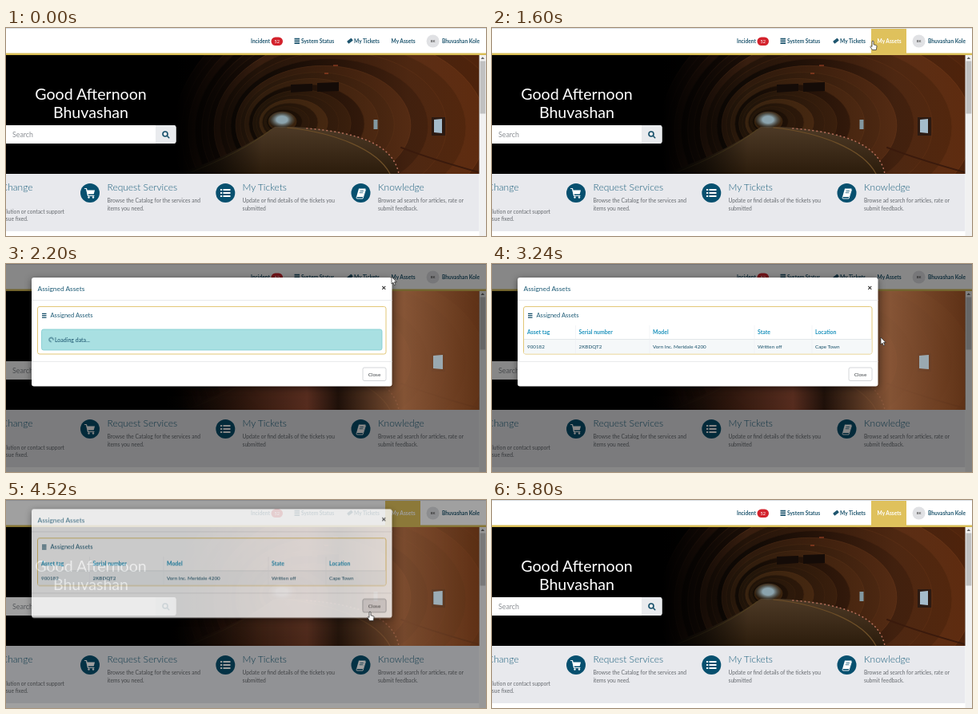
Recreate the animation shown at these times as an HTML page. Size 600x261 px, loop 5840 ms.

```html
<!DOCTYPE html>
<html lang="en">
<head>
<meta charset="utf-8">
<title>Assigned assets</title>
<style>
  html, body { margin: 0; width: 100%; height: 100%; overflow: hidden; background: #fff; }
  svg { display: block; font-family: Lato, "Open Sans", sans-serif; }
  .nav { font-size: 6.6px; font-weight: 700; fill: #1f566f; }
  .head { font-size: 12px; font-weight: 300; fill: #1b5f7c; }
  .body { font-size: 6.7px; fill: #666a6f; }
  .hello { font-size: 19.6px; fill: #fff; text-anchor: middle; }
  .end { text-anchor: end; }
  .mid { text-anchor: middle; }
  .title { fill: #1c5a75; }
  .th { font-size: 6.9px; font-weight: 700; fill: #1d93bd; }
  .td { font-size: 6.3px; fill: #17506a; }
  .line { fill: none; stroke-linecap: round; stroke-linejoin: round; }
  #spin { transform-box: fill-box; transform-origin: center; }
  #shadow { filter: drop-shadow(0 2px 4px rgba(0, 0, 0, .5)); }
</style>
</head>
<body>
<svg width="600" height="261" viewBox="0 0 600 261">
  <defs>
    <clipPath id="hero"><rect y="34" width="591.5" height="149"/></clipPath>
    <linearGradient id="shade">
      <stop offset=".36" stop-color="#000"/>
      <stop offset=".45" stop-color="#000" stop-opacity=".6"/>
      <stop offset=".54" stop-color="#000" stop-opacity="0"/>
    </linearGradient>
    <linearGradient id="warm">
      <stop offset=".55" stop-color="#8a3a14" stop-opacity="0"/>
      <stop offset=".85" stop-color="#9a4a20" stop-opacity=".35"/>
      <stop offset="1" stop-color="#8c3c10" stop-opacity=".45"/>
    </linearGradient>
    <linearGradient id="road" x2="0" y2="1">
      <stop offset="0" stop-color="#4d3a26"/>
      <stop offset="1" stop-color="#2c1c0c"/>
    </linearGradient>
    <radialGradient id="exit">
      <stop offset=".4" stop-color="#8ba3ad"/>
      <stop offset="1" stop-color="#5c6660" stop-opacity="0"/>
    </radialGradient>
    <linearGradient id="glow">
      <stop offset="0" stop-color="#140a06" stop-opacity="0"/>
      <stop offset=".25" stop-color="#35190f"/>
      <stop offset=".45" stop-color="#6a3526"/>
      <stop offset=".55" stop-color="#20100a"/>
      <stop offset=".76" stop-color="#a56a45"/>
      <stop offset="1" stop-color="#703c1c"/>
    </linearGradient>
  </defs>

  <rect width="600" height="261" fill="#fff"/>
  <rect width="600" height="1" fill="#d9dde3"/>

  <!-- navigation -->
  <rect y="31.5" width="600" height="2.5" fill="#d8bd55"/>
  <text class="nav" x="306" y="19">Incident</text>
  <rect x="331.5" y="11.5" width="14.5" height="10.5" rx="5.2" fill="#d3222c"/>
  <text class="mid" x="338.7" y="18.9" font-size="5.6" fill="#fff">52</text>
  <path d="M360.5 13.6h6.5M360.5 16.4h6.5M360.5 19.2h6.5" stroke="#1f566f" stroke-width="1.8"/>
  <text class="nav" x="369" y="19">System Status</text>
  <rect x="426.5" y="14.3" width="7" height="3.8" rx=".8" fill="#1f566f" transform="rotate(-38 430 16.2)"/>
  <text class="nav" x="435" y="19">My Tickets</text>
  <text class="nav" x="481.5" y="19">My Assets</text>
  <g id="tab">
    <rect x="474" y="1" width="44" height="33" fill="#dfc15c"/>
    <text class="nav" x="481.5" y="19" style="fill:#fff">My Assets</text>
  </g>
  <circle cx="533.6" cy="16.5" r="8" fill="#e0e1e4"/>
  <text class="mid" x="533.6" y="18" font-size="4.4" font-weight="700" fill="#555">BK</text>
  <text class="nav" x="545" y="19">Bhuvashan Kole</text>

  <!-- tunnel banner -->
  <g clip-path="url(#hero)">
    <rect y="34" width="592" height="149" fill="#070403"/>
    <g id="rings"></g>
    <rect y="34" width="592" height="149" fill="url(#warm)"/>
    <path d="M336 124H358C420 127 482 140 492 183H215Q292 156 336 124" fill="url(#road)"/>
    <g class="line">
      <path d="M352 125C410 131 464 152 480 183" stroke="#6e4f28" stroke-width="1.2"/>
      <path d="M332 127Q296 156 226 183" stroke="#54421f" stroke-width="1"/>
      <path d="M376 126C440 131 484 146 491 183" stroke="#b8705c" stroke-width="1.6" stroke-dasharray=".6 4.4"/>
      <path d="M591 181Q530 164 494 150" stroke="#3a1a0c" stroke-width="2"/>
    </g>
    <ellipse cx="345" cy="115" rx="17" ry="11" fill="url(#exit)"/>
    <path d="M356 71l27-1v9l-27 2zM389 69l27-1v11l-27 1z" fill="#140b07"/>
    <path d="M398 57h5M409 47h6" stroke="#b44a2a" stroke-width="1.2"/>
    <rect y="34" width="592" height="149" fill="url(#shade)"/>
    <rect x="532" y="112" width="17" height="23" fill="#2c1a12"/>
    <path d="M535 115l10-1v18l-10-1z" fill="#a5bccb"/>
    <rect x="459.5" y="115" width="5" height="12" fill="#8298a0"/>
  </g>
  <text class="hello" x="106" y="90">Good Afternoon</text>
  <text class="hello" x="106" y="113">Bhuvashan</text>
  <rect x="-4" y="122" width="216.5" height="23" rx="3" fill="#fff"/>
  <path d="M187 122h22.5q3 0 3 3v17q0 3-3 3h-22.5z" fill="#e9ebee"/>
  <text x="8" y="137" font-size="8.8" fill="#8b8f94">Search</text>
  <g class="line" stroke="#17506a" stroke-width="1.6">
    <circle cx="199" cy="133" r="3"/><path d="M201.3 135.3l2.4 2.4"/>
  </g>

  <!-- service tiles -->
  <rect y="183" width="591.5" height="72" fill="#e8e9ed"/>
  <text class="head end" x="33.5" y="204">Change</text>
  <text class="body end" x="73" y="232.5">a solution or contact support</text>
  <text class="body end" x="27.5" y="242">issue fixed.</text>
  <g fill="#07506f">
    <circle cx="105" cy="207" r="12"/><circle cx="274.3" cy="207" r="12"/><circle cx="443.5" cy="207" r="12"/>
  </g>
  <path d="M100.5 203.5h10.5l-1.3 5h-7.8z" fill="#fff"/>
  <path class="line" d="M98.500 201.5h2l2 9h7.5" stroke="#fff" stroke-width="1.2"/>
  <circle cx="103.5" cy="212.5" r="1.2" fill="#fff"/><circle cx="109" cy="212.5" r="1.2" fill="#fff"/>
  <path d="M268 203h2.2m1.3 0h9M268 207h2.2m1.3 0h9M268 211h2.2m1.3 0h9" stroke="#fff" stroke-width="2.2"/>
  <path d="M441 201.5h8.5l-3 10.5h-8.5z" fill="#fff"/>
  <path class="line" d="M438 212.5q-.5 1.5 1 1.5h7l3.5-11" stroke="#fff" stroke-width=".9"/>
  <path d="M442.500 204.5h4.5M441.8 206.7h4.5" stroke="#07506f" stroke-width=".8"/>
  <text class="head" x="126.5" y="204">Request Services</text>
  <text class="body" x="126.5" y="219">Browse the Catalog for the services and</text>
  <text class="body" x="126.5" y="228.7">items you need.</text>
  <text class="head" x="295.5" y="204">My Tickets</text>
  <text class="body" x="295.5" y="219">Update or find details of the tickets you</text>
  <text class="body" x="295.5" y="228.7">submitted</text>
  <text class="head" x="465" y="204">Knowledge</text>
  <text class="body" x="465" y="219">Browse ad search for articles, rate or</text>
  <text class="body" x="465" y="228.7">submit feedback.</text>

  <!-- scrollbar -->
  <rect x="591.5" y="34" width="8.5" height="227" fill="#f1f1f1"/>
  <path d="M593.5 39l2.3-2.8 2.3 2.8z" fill="#666"/>
  <rect x="592.5" y="41.5" width="6.8" height="66" fill="#c1c1c1"/>

  <g id="dim">
    <rect width="600" height="261" opacity=".47"/>
    <rect x="200" y="34" width="391.5" height="149" fill="url(#glow)" opacity=".75"/>
    <path d="M534 115l12-1v18l-12-1z" fill="#9aa9b0"/>
  </g>

  <!-- dialog -->
  <g id="modal">
    <rect id="shadow" x="32" y="17" width="450.5" height="136.5" rx="3" fill="#fff"/>
    <path d="M32 45.5h450.5M32 122.5h450.5" stroke="#e4e5e8" stroke-width=".8"/>
    <text class="title" x="39.5" y="34" font-size="8.4">Assigned Assets</text>
    <path d="M470.3 27.8l4 4m0-4l-4 4" stroke="#333" stroke-width="1.1"/>
    <rect x="39.5" y="53.5" width="435.5" height="59.5" rx="2.5" fill="#fff" stroke="#e2c777"/>
    <path d="M45 62.3h5.5M45 64.7h5.5M45 67.1h5.5" stroke="#17506a" stroke-width="1.3"/>
    <text class="title" x="55.5" y="67.2" font-size="7.55">Assigned Assets</text>
    <g id="loading">
      <rect x="44.5" y="82" width="425.5" height="26" rx="2.5" fill="#a9e0e2" stroke="#7fcbd0" stroke-width=".8"/>
      <circle id="spin" class="line" cx="56.5" cy="95" r="2.6" stroke="#17506a" stroke-dasharray="12 4.3"/>
      <text x="61" y="97.5" font-size="7" fill="#17506a">Loading data...</text>
    </g>
    <g id="table">
      <rect x="40" y="94.5" width="434.5" height="18" fill="#f5f8f9"/>
      <path d="M40 94.5h434.5" stroke="#dde2e5" stroke-width=".8"/>
      <path d="M104.5 77v35M197 77v35M328 77v35M400 77v35" stroke="#eceff1" stroke-width=".6"/>
      <g id="cells"></g>
    </g>
    <rect x="446" y="130" width="29" height="16.5" rx="2" fill="#fff" stroke="#c9ccd0" stroke-width=".8"/>
    <rect id="hover" x="446" y="130" width="29" height="16.5" rx="2" fill="#e4e4e6" stroke="#a9acb0" stroke-width=".8"/>
    <text class="mid" x="460.5" y="140.6" font-size="6.4" fill="#3f4448">Close</text>
  </g>

  <g id="cursor" stroke="#222" stroke-width=".7" fill="#fff" stroke-linejoin="round">
    <path id="arrow" d="M0 0v9l2-1.8 1.5 3.3 1.5-.7-1.5-3.2h2.7z"/>
    <path id="hand" d="M-1 .8q1-1.6 2 0v4l3.2.8q.9.3.8 1.4l-.7 4.5h-4.8l-2.7-4q.6-1.4 2.2-.1z"/>
  </g>
</svg>
<script>
  const LOOP = 5840;
  const OPEN = 1800, LOADED = 2680, CLOSE = 4490;
  const byId = id => document.getElementById(id);

  // steps: [ms, properties, easing to the next step]
  function play(id, steps) {
    const frames = steps.map(([ms, props, easing = 'linear']) => ({ offset: ms / LOOP, easing, ...props }));
    byId(id).animate(frames, { duration: LOOP, iterations: Infinity });
  }

  // visible only inside the given [from, to] spans
  function show(id, ...spans) {
    const steps = spans[0][0] > 0 ? [[0, { opacity: 0 }, 'step-end']] : [];
    for (const [from, to] of spans) {
      steps.push([from, { opacity: 1 }, 'step-end']);
      if (to < LOOP) steps.push([to, { opacity: 0 }, 'step-end']);
    }
    steps.push([LOOP, { opacity: steps.at(-1)[1].opacity }]);
    play(id, steps);
  }

  const fade = [
    [0, { opacity: 0 }], [OPEN, { opacity: 0 }], [OPEN + 150, { opacity: 1 }],
    [CLOSE, { opacity: 1 }], [CLOSE + 150, { opacity: 0 }], [LOOP, { opacity: 0 }]
  ];
  const move = (x, y) => ({ transform: `translate(${x}px, ${y}px)` });

  // arches drift right as they near the viewer, from olive to rust
  let rings = '';
  for (let i = 22; i > 0; i--) {
    const s = (i / 22) ** 1.7;
    const light = (i % 2 ? 7 : 11) + 3 * Math.sin(i * 1.3);
    const hue = 30 - 12 * s;
    rings += `<ellipse cx="${343 + 150 * s}" cy="${117 + 15 * s}" rx="${13 + 270 * s}" ry="${9 + 185 * s}"
      fill="hsl(${hue} 58% ${light}%)" stroke="hsl(${hue} 55% ${light + 5}%)" stroke-width="${.4 + s}"/>`;
  }
  byId('rings').innerHTML = rings;

  byId('cells').innerHTML = [
    [44, 'Asset tag', '900182'],
    [108.5, 'Serial number', '2KBDQT2'],
    [201, 'Model', 'Vorn Inc. Meridale 4200'],
    [332, 'State', 'Written off'],
    [404, 'Location', 'Cape Town']
  ].map(([x, name, value]) =>
    `<text class="th" x="${x}" y="88">${name}</text><text class="td" x="${x}" y="106">${value}</text>`).join('');

  play('dim', fade);
  play('modal', fade);
  play('modal', [
    [0, move(0, -34)], [OPEN, move(0, -34), 'ease-out'], [OPEN + 300, move(0, 0)],
    [CLOSE, move(0, 0), 'ease-out'], [CLOSE + 300, move(0, -34)], [LOOP, move(0, -34)]
  ]);
  show('loading', [0, LOADED]);
  show('table', [LOADED, LOOP]);
  show('tab', [1520, OPEN], [CLOSE, LOOP]);
  show('hover', [3880, LOOP]);
  show('hand', [1520, 1880], [3880, 4640]);
  show('arrow', [0, 1520], [1880, 3880], [4640, LOOP]);
  byId('spin').animate([{ transform: 'rotate(0)' }, { transform: 'rotate(360deg)' }],
    { duration: LOOP / 6, iterations: Infinity });

  play('cursor', [
    [0, move(446, -16)], [900, move(446, -16), 'ease-out'], [1360, move(470, 18)],
    [1520, move(476, 16)], [1720, move(476, 16), 'ease-in-out'], [2000, move(482, 16)],
    [2700, move(482, 16), 'ease-in-out'], [3100, move(486, 92)],
    [3320, move(486, 92), 'ease-in-out'], [3920, move(455, 140)],
    [5200, move(455, 140), 'ease-in'], [5720, move(470, 268)], [LOOP, move(470, 268)]
  ]);
</script>
</body>
</html>
```
